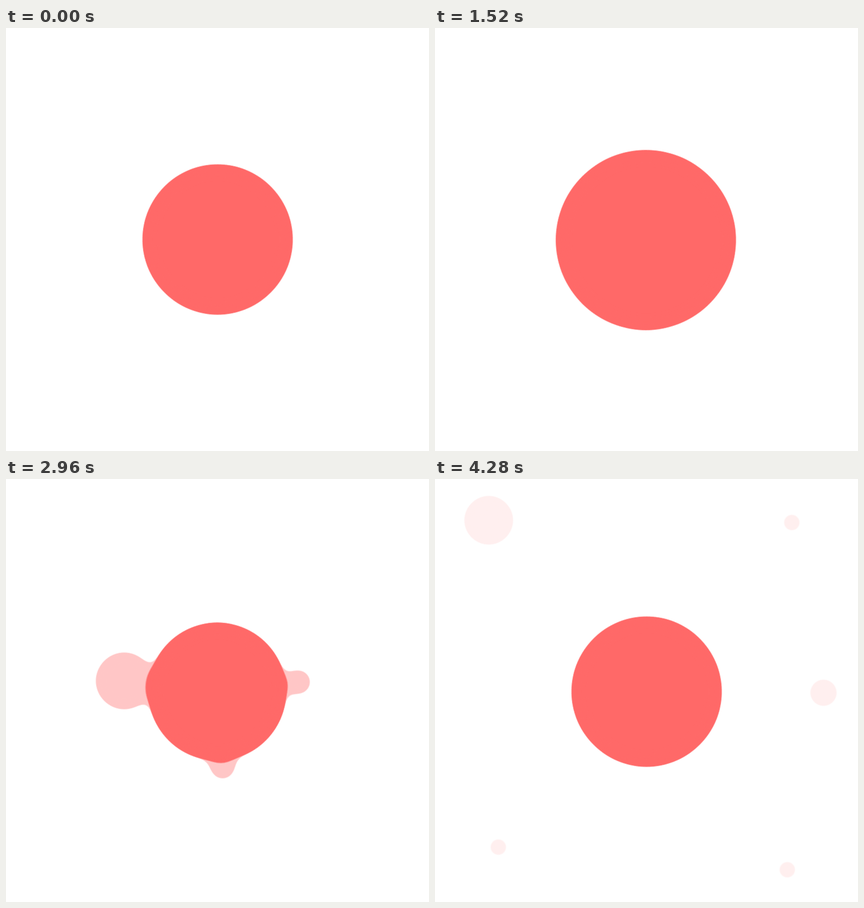
Recreate the animation shown at these times as an HTML page. Size 748 by 748 pixels, loop 4.8 s.

```html
<!DOCTYPE html>
<html lang="en">
<head>
<meta charset="utf-8">
<title>Gooey blob</title>
<style>
  html, body { margin: 0; width: 100%; height: 100%; overflow: hidden; background: #fff; }
  svg { display: block; width: 100%; height: 100%; fill: #ff6968; }
</style>
</head>
<body>
<svg viewBox="0 0 748 748">
  <filter id="goo" filterUnits="userSpaceOnUse" x="-60" y="-60" width="868" height="868" color-interpolation-filters="sRGB">
    <feGaussianBlur stdDeviation="12.5"/>
    <feColorMatrix values="1 0 0 0 0  0 1 0 0 0  0 0 1 0 0  0 0 0 18 -7"/>
  </filter>
  <g id="pale"><g id="paleBlobs" filter="url(#goo)"></g></g>
  <g id="solid" filter="url(#goo)"></g>
</svg>
<script>
const LOOP = 4800, REST = 4280, STEP = 40;
const SWELL = 1100, MERGED = 1450, BURST = 2400, SHRINK = 3240, FADE = 3760;
const CENTRE = [374, 375];
const IN_TIMES = [520, 1080, MERGED];
const OUT_TIMES = [BURST, 2960, FADE, REST];

const incoming = [
  { r: 20, born: 425, path: [[498, 98], [413, 250], CENTRE] },
  { r: 20.5, born: 445, path: [[39, 246], [219, 305], CENTRE] },
  { r: 50, born: 380, path: [[637, 494], [508, 368], CENTRE] },
  { r: 30, born: 300, path: [[187, 594], [277, 456], CENTRE] }
];
const outgoing = [
  { r: 50, path: [CENTRE, [209, 357], [72, 196], [95, 73]] },
  { r: 20, path: [CENTRE, [517, 359], [680, 199], [631, 77]] },
  { r: 30, path: [CENTRE, [452, 392], [603, 407], [687, 378]] },
  { r: 20, path: [CENTRE, [285, 408], [56, 519], [112, 651]] },
  { r: 20, path: [CENTRE, [383, 509], [492, 673], [623, 691]] }
];

const byId = id => document.getElementById(id);
const ramp = (t, from, to) => Math.min(1, Math.max(0, (t - from) / (to - from)));
const ease = (t, from, to) => (1 - Math.cos(Math.PI * ramp(t, from, to))) / 2;

// Hermite curve with parabolic tangents; it also runs on before the first point.
function curve(times, values, t) {
  const last = times.length - 1;
  const gap = i => times[i + 1] - times[i];
  const slope = i => (values[i + 1] - values[i]) / gap(i);
  const tangent = i => {
    if (i === 0) return 2 * slope(0) - tangent(1);
    if (i === last) return 2 * slope(i - 1) - tangent(i - 1);
    return (slope(i - 1) * gap(i) + slope(i) * gap(i - 1)) / (gap(i) + gap(i - 1));
  };
  let i = 0;
  while (i < last - 1 && t > times[i + 1]) i++;
  const h = gap(i), u = (t - times[i]) / h, v = 1 - u;
  return v * v * (1 + 2 * u) * values[i] + u * u * (3 - 2 * u) * values[i + 1]
    + h * u * v * (v * tangent(i) - u * tangent(i + 1));
}

const along = (times, path, t) => [0, 1].map(axis => curve(times, path.map(p => p[axis]), t));

// The core drifts round a tiny circle.
function corePlace(t) {
  const turn = 7 * Math.PI * t / REST;
  return [CENTRE[0] + 0.2 - 1.3 * Math.sin(turn), CENTRE[1] - Math.cos(turn)];
}

// Swell as the drops arrive, dip, collapse at the burst, then recover.
function coreSize(t) {
  const dip = Math.sin(Math.PI * ramp(t, 1620, 2380)) ** 2;
  return 133 + 29 * ease(t, SWELL, 1620) - 6 * dip
    - 40 * ease(t, 2380, 2920) + 11 * ramp(t, 2920, REST) ** 2;
}

function addCircle(parent) {
  const c = document.createElementNS("http://www.w3.org/2000/svg", "circle");
  return byId(parent).appendChild(c);
}

// The filter shifts edges with curvature, so the drawn radius makes up for it.
function place(circle, [x, y], r, opacity) {
  circle.setAttribute("cx", x);
  circle.setAttribute("cy", y);
  circle.setAttribute("r", r - 2.6 + 78 / r);
  circle.setAttribute("opacity", opacity);
}

const paleCore = addCircle("paleBlobs"), core = addCircle("solid");
incoming.forEach(d => d.solid = addCircle("solid"));
outgoing.forEach(d => {
  d.pale = addCircle("paleBlobs");
  d.solid = addCircle("solid");
});

function draw(time) {
  const t = Math.min(REST, Math.floor(time % LOOP / STEP) * STEP);
  const out = t >= BURST ? 1 : 0;

  place(core, corePlace(t), coreSize(t), 1);
  place(paleCore, corePlace(t), coreSize(t), t < SHRINK ? 1 : 0);

  for (const d of incoming) {
    const shown = t >= d.born && t <= MERGED;
    place(d.solid, along(IN_TIMES, d.path, t), d.r, shown ? 0.4 + 0.6 * ramp(t, d.born, d.born + 70) : 0);
  }
  // Faint drops in the solid layer make the core bulge towards the pale ones.
  for (const d of outgoing) {
    const spot = along(OUT_TIMES, d.path, t), r = d.r - 7 * ramp(t, SHRINK, REST);
    place(d.pale, spot, r, out);
    place(d.solid, spot, r, 0.22 * out);
  }

  const soft = 2 * Math.sin(Math.PI * ramp(t, SHRINK, REST));
  byId("pale").style.filter = soft > 0.01 ? `blur(${soft}px)` : "none";
  byId("pale").setAttribute("opacity", out * (0.373 - 0.271 * ramp(t, FADE, REST)));
}

const start = performance.now();
function tick() {
  draw(performance.now() - start);
  requestAnimationFrame(tick);
}
tick();
</script>
</body>
</html>
```
